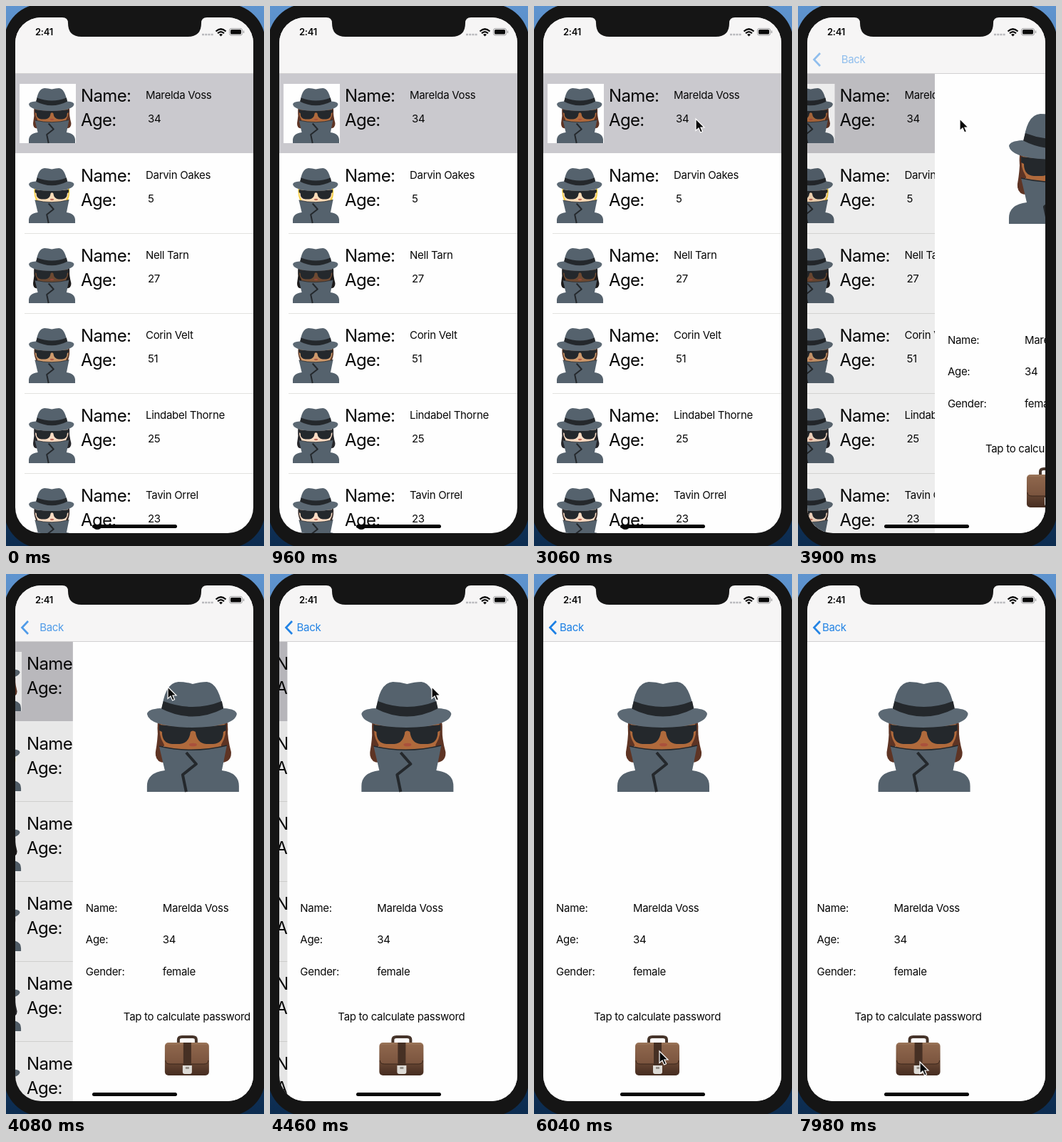
Write an HTML page that moves like this. It is 362 px wide and 756 px high and loops after 8 s.

```html
<!DOCTYPE html>
<html lang="en">
<head>
<meta charset="utf-8">
<title>Agent list</title>
<style>
  html, body { margin: 0; width: 100%; height: 100%; overflow: hidden; }
  svg { display: block; width: 100%; height: 100%; }
  text { font: 15px Inter, Roboto, sans-serif; letter-spacing: -.02em; fill: #080808; white-space: pre; }
  .label { font-size: 24px; letter-spacing: -.027em; }
  .clock { font-size: 13px; font-weight: 600; letter-spacing: -.02em; }
  .link { fill: #1b7fe4; }
  .ink { fill: #24282c; }
  .coat { fill: #55626d; }
  .brim { fill: #5c6974; }
</style>
</head>
<body>
<svg viewBox="0 0 362 756" preserveAspectRatio="none">
  <defs>
    <linearGradient id="desk" x2="0" y2="1">
      <stop offset="0" stop-color="#5f94cf"/>
      <stop offset=".5" stop-color="#2f5a8c"/>
      <stop offset="1" stop-color="#0c2c50"/>
    </linearGradient>
    <linearGradient id="leather" x2="0" y2="1">
      <stop offset="0" stop-color="#9a7458"/>
      <stop offset=".55" stop-color="#6c4a36"/>
      <stop offset="1" stop-color="#452c20"/>
    </linearGradient>
    <clipPath id="screen"><rect x="13" y="16" width="334" height="722" rx="36"/></clipPath>

    <g id="spy">
      <path fill="var(--locks)" d="M18 56Q23 75 25 113Q11 113 12 98Q16 76 15 58ZM108 56Q103 75 103 113Q119 113 118 98Q112 76 113 58Z"/>
      <path fill="var(--hair)" d="M16 52H112Q116 72 109 90H20Q12 72 16 52Z"/>
      <path fill="var(--skin)" d="M21 54H107Q113 66 108 80L104 88V108H24V88L20 80Q15 66 21 54Z"/>
      <ellipse cx="64.500" cy="88" rx="5.500" ry="2.300" fill="#a8483c" opacity=".75"/>
      <path class="ink" d="M17 60Q64 66 111 60V68L107 70Q107 86 93 87H83Q70 86 68 70Q64 67 61 70Q59 86 46 87H35Q21 86 21 70L17 68Z"/>
      <path class="coat" d="M17 90Q64 101 112 89L105 124Q129 127 129 146V154H0V146Q0 127 25 124Z"/>
      <path fill="none" stroke="#24282c" stroke-width="1.500" d="M17 90Q64 101 112 89"/>
      <path fill="none" stroke="#24282c" stroke-width="4" stroke-linejoin="round" d="M55 99L69 115L50 130L55 154"/>
      <path class="coat" d="M20 44Q24 1 44 0Q54 0 64 3Q75 0 84 0Q101 1 108 44Z"/>
      <path class="ink" d="M23 27Q64 43 105 27L109 45Q64 62 18 45Z"/>
      <path class="brim" d="M0 45Q1 38 19 37Q64 60 108 37Q125 38 126 45Q123 63 63 64Q3 63 0 45Z"/>
    </g>

    <g id="case">
      <path fill="none" stroke="#46342a" stroke-width="4" d="M20 12V7Q20 3 25 3H40Q45 3 45 7V12"/>
      <rect x="1" y="11" width="62" height="46" rx="5" fill="url(#leather)"/>
      <path fill="#8a6248" opacity=".6" d="M2 14H62V36Q62 41 56 41H8Q2 41 2 36Z"/>
      <path fill="none" stroke="#38241a" d="M2 36Q2 41 8 41H56Q62 41 62 36"/>
      <rect x="27" y="11" width="11" height="32" fill="#463024"/>
      <path fill="#dedbd6" d="M26 43H39V52Q39 55 36 55H29Q26 55 26 52Z"/>
      <rect x="30" y="45" width="5" height="3" fill="#96918a"/>
    </g>
  </defs>

  <rect width="362" height="756" fill="url(#desk)"/>
  <rect x="-3" y="-3" width="367" height="762" rx="54" fill="#151515"/>

  <g clip-path="url(#screen)">
    <rect x="13" y="16" width="334" height="722" fill="#fefefe"/>
    <g id="list"></g>
    <rect id="shade" x="13" y="94" width="334" height="644"/>

    <g id="detail">
      <rect x="13" y="94" width="334" height="644" fill="#fefefe"/>
      <use href="#spy" x="117" y="151" style="--skin:#b06a3c;--hair:#5e3424;--locks:#5e3424"/>
      <g id="facts"></g>
      <text x="84" y="625">Tap to calculate password</text>
      <use href="#case" x="141" y="645"/>
    </g>
    <rect id="next" x="347" y="94" width="334" height="644" fill="#fefefe"/>

    <rect x="13" y="16" width="334" height="78" fill="#f6f5f5"/>
    <rect x="13" y="94" width="334" height="1" fill="#d2d1d2"/>
    <g id="back">
      <path fill="none" stroke="#1b7fe4" stroke-width="2.700" d="M31 66L22.500 75L31 84"/>
      <text id="backText" class="link" x="36" y="80">Back</text>
    </g>

    <text class="clock" x="41" y="41">2:41</text>
    <path stroke="#b8b8bc" stroke-width="2.500" stroke-dasharray="3 1.200" d="M275 40H291"/>
    <g fill="none" stroke="#080808" stroke-width="2.200">
      <path d="M294.500 35.500Q301.500 29 308.500 35.500M297 38.300Q301.500 34 306 38.300"/>
      <path fill="#080808" stroke="none" d="M299 40Q301.500 38 304 40L301.500 42.500Z"/>
      <rect x="313.500" y="31.500" width="18" height="9.500" rx="2.500" stroke="#a0a0a2" stroke-width="1"/>
      <rect x="315" y="33" width="15" height="6.500" rx="1.500" fill="#080808" stroke="none"/>
      <path stroke="#a0a0a2" stroke-width="1.300" d="M333.500 34.500V38"/>
    </g>
    <rect x="121" y="726" width="119" height="5" rx="2.500" fill="#050505"/>
  </g>
  <path fill="#151515" d="M79 15V16Q87 16 87 24Q87 43 106 43H255Q274 43 274 24Q274 16 282 16V15Z"/>

  <path id="cursor" fill="#080808" stroke="#fefefe" stroke-width="1.200" d="M0 0V16.500L4 13L6.600 19L9.500 17.700L6.900 12H12Z"/>
</svg>

<script>
const SCREEN_WIDTH = 334, ROW = 112, LOOP = 8000;
const el = id => document.getElementById(id);
const clamp = v => Math.min(1, Math.max(0, v));

// Name, age, skin, hair, long hair
const people = [
  ['Marelda Voss', 34, '#b06a3c', '#5e3424', true],
  ['Darvin Oakes', 5, '#fbdcb8', '#f6cf3c', false],
  ['Nell Tarn', 27, '#6e4a32', '#1c1a1a', true],
  ['Corin Velt', 51, '#cf9a6c', '#5e3a28', false],
  ['Lindabel Thorne', 25, '#fbdcc4', '#26262a', true],
  ['Tavin Orrel', 23, '#fbdcc4', '#3a2c28', false]
];

const row = ([name, age, skin, hair, long], i) => `
  <g transform="translate(0 ${94 + i * ROW})">
    ${i ? '' : `<rect x="13" width="450" height="${ROW}" fill="#cac9ce"/>
      <rect x="19" y="15" width="79" height="83" fill="#fefefe"/>`}
    <use href="#spy" transform="translate(32 21) scale(.504 .5)"
      style="--skin:${skin};--hair:${hair};--locks:${long ? hair : 'none'}"/>
    <text class="label" x="105" y="39.500">Name:</text>
    <text class="label" x="105" y="74">Age:</text>
    <text x="196" y="36">${name}</text>
    <text x="199" y="69">${age}</text>
    ${i ? `<rect x="26" y="${ROW}" width="430" height="1" fill="#e2e2e0"/>` : ''}
  </g>`;

el('list').innerHTML = people.map(row).join('');

const facts = [['Name:', people[0][0], 473], ['Age:', people[0][1], 517], ['Gender:', 'female', 562]];
el('facts').innerHTML = facts.map(([label, value, y]) =>
  `<text x="31" y="${y}">${label}</text><text x="139" y="${y}">${value}</text>`).join('');

// Critically damped spring, 0 to 1
function push(t, start) {
  const s = Math.max(0, t - start) * .0065;
  return 1 - (1 + s) * Math.exp(-s);
}

// Cursor stops: time, x, y
const path = [
  [1900, 366, 290], [2080, 333, 250], [2800, 227, 158], [4900, 227, 158],
  [5800, 176, 668], [6700, 176, 668], [7300, 171, 683], [LOOP, 171, 683]
];

function cursorAt(t) {
  const i = path.findIndex(p => p[0] > t);
  const [a, b] = [path[i - 1], path[i]];
  const k = clamp((t - a[0]) / (b[0] - a[0])), e = k * k * (3 - 2 * k);
  return [a[1] + (b[1] - a[1]) * e, a[2] + (b[2] - a[2]) * e];
}

const shift = (id, x, y = 0) => el(id).setAttribute('transform', `translate(${x} ${y})`);

function draw(t) {
  const open = push(t, 3660), leave = push(t, 7930);

  shift('list', -.3 * SCREEN_WIDTH * open);
  shift('detail', SCREEN_WIDTH * (1 - open - .3 * leave));
  shift('next', -SCREEN_WIDTH * leave);
  shift('backText', 46 * (1 - open - leave));
  el('back').setAttribute('opacity', open * (1 - leave));
  el('shade').setAttribute('opacity', .1 * Math.sqrt(open));

  const visible = t >= path[0][0];
  el('cursor').setAttribute('visibility', visible ? 'visible' : 'hidden');
  if (visible) shift('cursor', ...cursorAt(t));
}

const begin = performance.now();
function tick() {
  draw((performance.now() - begin) % LOOP);
  requestAnimationFrame(tick);
}
tick();
</script>
</body>
</html>
```
